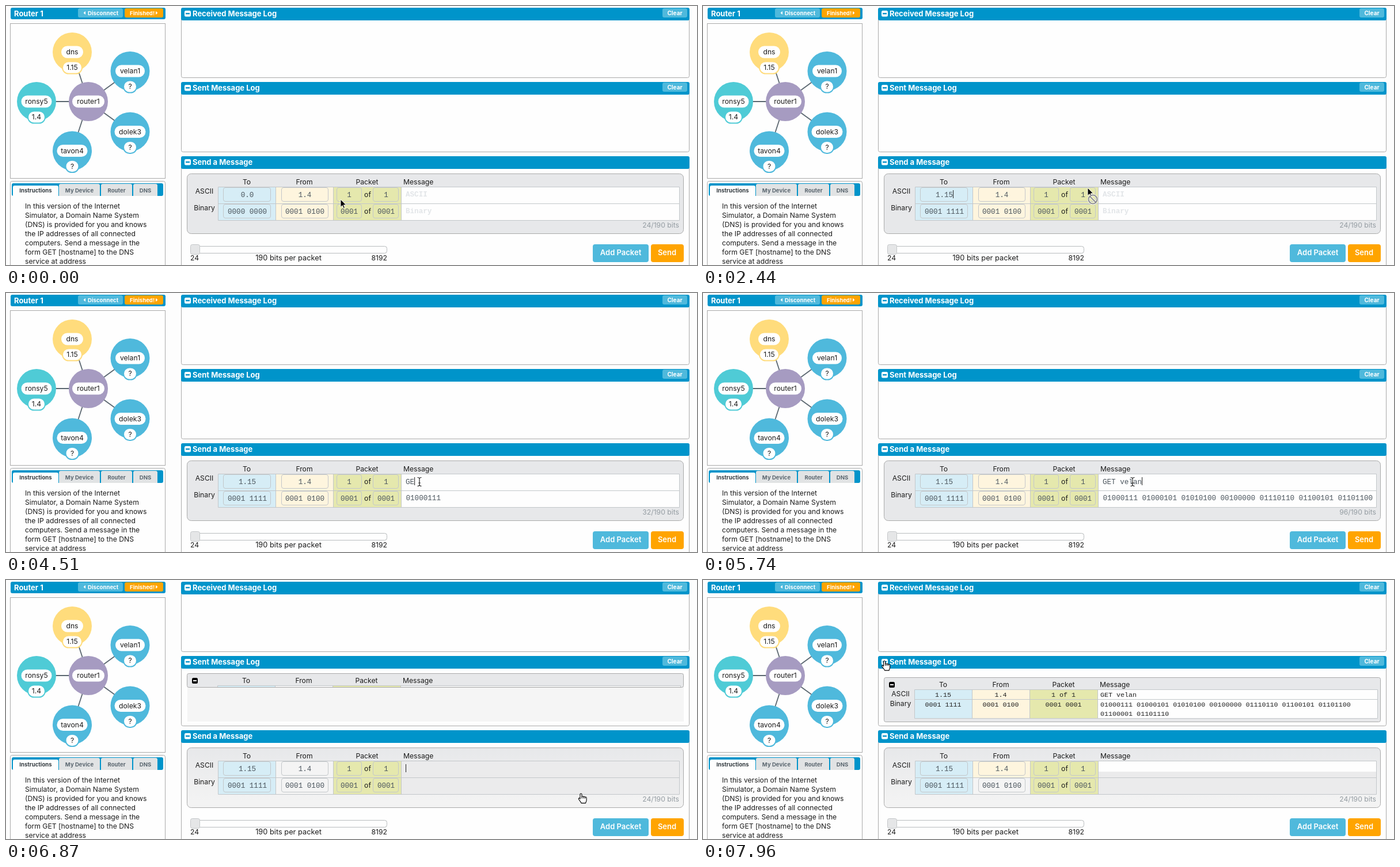
These frames come from a looping animation (1200x450 px, 8000 ms). An HTML page:

```html
<!DOCTYPE html>
<html lang="en">
<head>
<meta charset="utf-8">
<title>Internet Simulator</title>
<style>
html, body { margin: 0; width: 100%; height: 100%; overflow: hidden; background: #fdfdfd; }
svg { display: block; width: 100vw; height: 100vh; }
text { font: 12.2px Inter, "Open Sans", sans-serif; fill: #1c1c1c; }
.mid { text-anchor: middle; }
.end { text-anchor: end; }
.head { font-size: 13px; font-weight: 700; fill: #fff; }
.small { font-size: 9.6px; font-weight: 700; fill: #fff; }
.tab { font-size: 9.6px; font-weight: 700; fill: #5b6770; }
.btn { font-size: 13px; font-weight: 600; fill: #fff; }
.mono { font: 12.6px "Liberation Mono", "Courier New", monospace; fill: #4d575f; }
.log { font: 11.7px "Liberation Mono", "Courier New", monospace; fill: #222; }
.hint { font-weight: 700; fill: #e2e5e8; }
.dim { fill: #949ca2; }
</style>
</head>
<body>
<svg id="stage" viewBox="0 0 1200 450" preserveAspectRatio="none"></svg>
<script>
const LOOP = 8000, CHAR = 7.56;
const BLUE = '#0094ca', SKY = '#4fb9dc', ORANGE = '#ffa400', PANEL = '#e7e8ea';
const TO = '#d6edf6', FROM = '#fef5de', PACKET = '#e5e8ad', WHITE = '#fefefe';
const EDGE = '#aaaaaa', RULE = '#c3c7ca';
const HOST = 'velan', MESSAGE = 'GET ' + HOST;

const rect = (x, y, w, h, fill, more = '') =>
  `<rect x="${x}" y="${y}" width="${w}" height="${h}" fill="${fill}" ${more}/>`;
const text = (x, y, s, cls = '', more = '') =>
  `<text x="${x}" y="${y}" class="${cls}" ${more}>${s}</text>`;
const path = (d, more) => `<path d="${d}" ${more}/>`;
const group = (id, body, more = '') => `<g id="${id}" ${more}>${body}</g>`;
const line = (d, color = RULE) => path(d, `fill="none" stroke="${color}"`);
const stroke = c => `stroke="${c}"`;

function nodes() {
  const list = [
    [115, 80, '#ffdc7c', 'dns', 38, '1.15', 36],
    [215.5, 113, SKY, HOST + '1', 51, '?', 25],
    [215.5, 218.5, SKY, 'dolek3', 54, '?', 25],
    [115, 251.5, SKY, 'tavon4', 53, '?', 25],
    [53, 166, '#4fcbd6', 'ronsy5', 53, '1.4', 32],
    [143, 166, '#a69bc1', 'router1', 56]
  ];
  const spokes = list.slice(0, 5).map(([x, y]) =>
    path(`M143 166L${x} ${y}`, 'stroke="#5b6770" stroke-width="1.8"')).join('');
  return spokes + list.map(([x, y, color, name, w, addr, aw]) =>
    `<circle cx="${x}" cy="${y}" r="34" fill="${color}"/>` +
    rect(x - w / 2, y - 10.5, w, 21, '#fff', 'rx="10.5"') +
    text(x, y + 4, name, 'mid') +
    (addr ? rect(x - aw / 2 + 1, y + 16.5, aw - 2, 21, '#fff', `rx="10.5" stroke-width="2" ${stroke(color)}`) +
      text(x, y + 31, addr, 'mid') : '')).join('');
}

function sidebar() {
  const tabs = [[12, 79, 'Instructions'], [92, 71, 'My Device'], [165, 54, 'Router'], [221, 42, 'DNS']];
  const lines = ['In this version of the Internet', 'Simulator, a Domain Name System',
    '(DNS) is provided for you and knows', 'the IP addresses of all connected',
    'computers. Send a message in the', 'form GET [hostname] to the DNS', 'service at address'];
  return rect(8, 3, 269, 20, BLUE, 'rx="3"') + text(14, 18, 'Router 1', 'head') +
    rect(125, 4, 78, 16, SKY, 'rx="3"') + path('M138 9v6l-3.5-3z', 'fill="#fff"') +
    text(142, 15.5, 'Disconnect', 'small') +
    rect(206, 4, 67, 16, ORANGE, 'rx="3"') + path('M260 9v6l3.5-3z', 'fill="#fff"') +
    text(215, 15.5, 'Finished!', 'small') +
    rect(7.5, 30.5, 269, 269, WHITE, stroke(EDGE)) + nodes() +
    rect(7.5, 304.5, 269, 160, WHITE, stroke(EDGE) + ' rx="3"') +
    rect(10, 308, 263, 22, BLUE, 'rx="3"') +
    tabs.map(([x, w, s], i) =>
      path(`M${x} ${i ? 330 : 332}v-18q0-3 3-3h${w - 6}q3 0 3 3v18z`, `fill="${i ? '#e1e3e4' : WHITE}" transform="translate(0 ${i ? 0 : 1})"`) +
      text(x + w / 2, 324, s, 'tab mid', i ? '' : 'style="fill:#333b40"')).join('') +
    lines.map((s, i) => text(33, 352 + 16 * i, s)).join('');
}

function section(y, title, bottom, clear) {
  return rect(304.5, y + 10.5, 882, bottom - y - 10.5, WHITE, stroke(EDGE) + ' rx="3"') +
    rect(304, y, 883, 22, BLUE, 'rx="3"') +
    rect(310, y + 5, 11, 10.5, '#fff', 'rx="2.5"') + rect(312, y + 9, 7, 2.4, BLUE) +
    text(324, y + 14.5, title, 'head') +
    (clear ? rect(1140, y + 1, 43, 16, SKY, 'rx="3"') +
      text(1161.5, y + 12.8, 'Clear', 'small mid', 'style="font-size:10px"') : '');
}

function entry() {
  const heads = text(417, 17, 'To', 'mid') + text(517, 17, 'From', 'mid') +
    text(626, 17, 'Packet', 'mid') + text(689, 17, 'Message') +
    text(343, 33, 'ASCII', 'mid') + text(343, 50, 'Binary', 'mid');
  const cells = [[417, '1.15', '0001 1111'], [517, '1.4', '0001 0100'], [626, '1 of 1', '0001 0001']];
  const bytes = toBytes(MESSAGE);
  return group('slideBack', rect(315, 0, 862, 84, '#f5f5f5')) +
    `<clipPath id="clip"><rect id="clipBox" x="314" y="0" width="864" height="78"/></clipPath>` +
    rect(314.5, .5, 862, 77, PANEL, `id="entryBox" rx="3" ${stroke(EDGE)}`) +
    group('entryBody', rect(323, 8, 10, 10, '#000', 'rx="2.5"') + rect(325, 12, 6, 2, '#fff') + heads +
      rect(367, 21, 100, 51, TO) + rect(467, 21, 100, 51, FROM, 'id="entryFrom"') +
      rect(567, 21, 118, 51, PACKET) + rect(685, 21, 486, 51, WHITE, 'id="entryMsg"') +
      line('M367.5 21.5H1171.5V71.5H367.5zM367 38.5H1171M467.5 21V71M567.5 21V71M685.5 21V71') +
      cells.map(([x, a, b]) => text(x, 34, a, 'log mid') + text(x, 51, b, 'log mid')).join('') +
      text(690, 34, MESSAGE, 'log') + text(690, 51, bytes.slice(0, 7).join(' '), 'log') +
      text(690, 67, bytes.slice(7).join(' '), 'log'), 'clip-path="url(#clip)"');
}

function form() {
  const field = (x, w) => [315.5, 344.5].map(y =>
    rect(x + .5, y, w, 24, 'none', `rx="3.5" ${stroke(RULE)}`)).join('');
  const value = (x, a, b) => text(x, 332, a, 'mono mid') + text(x, 361, b, 'mono mid');
  return rect(314.5, 291.5, 862, 104, PANEL, `id="formBox" rx="7" ${stroke(EDGE)}`) +
    text(418, 310, 'To', 'mid') + text(518, 310, 'From', 'mid') + text(627, 310, 'Packet', 'mid') +
    text(690, 310, 'Message') + text(344.5, 326, 'ASCII', 'mid') + text(344.5, 355, 'Binary', 'mid') +
    rect(369, 315, 100, 57, TO) + rect(469, 315, 100, 57, FROM) + rect(569, 315, 118, 57, PACKET) +
    rect(687, 315, 482, 57, WHITE) +
    group('faded', rect(469, 315, 100, 57, '#f4f4f4') + rect(687, 315, 482, 57, '#ebebec')) +
    rect(687, 315, 482, 18, WHITE, 'id="msgBack"') + rect(469, 315, 100, 28, FROM, 'id="fromBack"') +
    line('M368.5 314.5H1169.5V372.5H368.5zM369 343.5H1169M468.5 315V372M568.5 315V372M686.5 315V372') +
    field(377, 82) + field(478, 81) + field(574, 43) + field(637, 44) +
    text(628, 332, 'of', 'mid') + text(628, 361, 'of', 'mid') +
    rect(408, 321, 22, 14, '#b5d5fd', 'id="pick"') +
    group('values', text(419, 332, '', 'mono mid', 'id="to"') + text(419, 361, '', 'mono mid', 'id="toBin"') +
      value(519, '1.4', '0001 0100') + value(596, '1', '0001') + value(660, '1', '0001')) +
    group('hints', text(694, 331, 'ASCII', 'mono hint') + text(694, 360, 'Binary', 'mono hint')) +
    text(694, 331.5, '', 'mono', 'id="msg"') + text(694.5, 360, '', 'mono', 'id="msgBin"') +
    rect(0, 320, 1, 14, '#222', 'id="caret"') +
    text(1169, 385, '', 'end dim', 'id="count"');
}

function controls() {
  return line('M337 417.5H658q3.500 0 3.500 3.500V426q0 3.500-3.500 3.500H337', '#e6e8e9') +
    group('slider', rect(320.5, 417.5, 341, 12, WHITE, `rx="4" ${stroke('#b9bcbe')}`) +
      rect(320.5, 414.5, 16, 17, '#e5e6e7', `rx="3" ${stroke('#c4c7c9')}`)) +
    text(320, 442, '24') + text(490.5, 442, '190 bits per packet', 'mid', 'style="font-size:12.8px"') +
    text(662, 442, '8192', 'end') +
    rect(1019, 414, 97, 31, SKY, 'id="add" rx="4"') + text(1067.5, 433, 'Add Packet', 'btn mid') +
    rect(1120, 414, 57, 31, ORANGE, 'id="send" rx="4"') + text(1148, 433, 'Send', 'btn mid');
}

function pointers() {
  const arrow = path('M0 0V13.500L3.200 10.600 5.300 15.500 7.400 14.600 5.300 9.800H9.700z', 'fill="#000" stroke="#fff" stroke-width=".9"');
  const beam = path('M-3.500-7.500Q0-7.500 0-5V5Q0 7.500-3.500 7.500M3.500-7.500Q0-7.500 0-5V5Q0 7.500 3.500 7.500M-1.800 2H1.800', 'fill="none" stroke="#222" stroke-width="1.2"');
  const sign = w => `<circle cx="9" cy="20" r="7.500" fill="none" ${w}/>` + path('M4 15L14 25', w);
  const hand = path('M-4.500-7c0-2 3-2 3 0v4c0-1 2.600-1.200 2.800.3.4-1 2.600-.8 2.700.6.6-.8 2.600-.4 2.600 1.200v4c0 2-1.200 3-1.600 5h-7.400c-.5-2-3.400-4.500-4.600-6.800-.8-1.600 1-2.800 2.500-.8zM-1.500-3v3M1.300-2.700v2.700M4-2.100v2.300',
    'fill="#fff" stroke="#000" stroke-width="1.1"');
  return group('pointer', group('arrow', arrow) + group('beam', beam) +
    group('sign', sign('stroke="#fff" stroke-width="3.4"') + sign('stroke="#8d8d8d" stroke-width="2"')) +
    group('hand', hand));
}

function toBytes(s) {
  return [...s].map(c => c.charCodeAt(0).toString(2).padStart(8, '0'));
}

document.getElementById('stage').innerHTML =
  `<defs><linearGradient id="wash" x2="0" y2="1"><stop stop-color="${PANEL}"/><stop offset=".9" stop-color="#f3f3f3"/></linearGradient></defs>` +
  rect(0, 0, 1200, 450, '#fdfdfd') + sidebar() +
  section(3, 'Received Message Log', 124.5, true) + section(132, 'Sent Message Log', 253.5, true) +
  group('entry', entry()) + section(261, 'Send a Message', 470) +
  form() + controls() + pointers();

const ui = {};
document.querySelectorAll('[id]').forEach(e => ui[e.id] = e);
const show = (id, on) => ui[id].style.display = on ? '' : 'none';
const set = (id, name, v) => ui[id].setAttribute(name, v);
const write = (id, s) => { if (ui[id].textContent !== s) ui[id].textContent = s; };
const within = (t, a, b) => t >= a && t < b;

// Step tracks: the value holds until the next time
const at = (track, t) => track.reduce((v, [when, next]) => t >= when ? next : v, track[0][1]);
const toTrack = [[0, '0.0'], [1340, '1'], [1690, '1.'], [1800, '1.1'], [2040, '1.15']];
const binTrack = [[0, '0000 0000'], [1450, '0001 0000'], [1980, '0001 0001'], [2100, '0001 1111']];
const msgTrack = [[0, ''], [3210, 'G'], [3410, 'Ge'], [3560, 'Get'], [4330, 'Ge'], [4400, 'G'], [4510, 'GE'], [4680, 'GET']];
for (let n = 4; n <= MESSAGE.length; n++) msgTrack.push([5040 + 68 * (n - 4), MESSAGE.slice(0, n)]);
const kindTrack = [[0, 'arrow'], [340, 'beam'], [2200, 'arrow'], [2380, 'sign'], [2500, 'beam'], [5920, 'arrow'], [6220, 'hand']];

const route = [[40, 581, 336], [160, 545, 342], [280, 440, 343], [340, 416, 346], [460, 416, 346], [520, 419, 328],
  [2140, 419, 328], [2200, 450, 322], [2320, 580, 303], [2440, 668, 316], [2560, 722, 326], [2680, 718, 328],
  [5680, 718, 328], [5740, 746, 328], [5920, 900, 350], [6160, 1090, 420], [6340, 1147, 440], [6460, 1148, 436],
  [6700, 1148, 436], [6940, 855, 323], [7120, 600, 220], [7300, 600, 220], [7600, 400, 135], [7780, 330, 128], [7960, 318, 149]];

function place(t) {
  const i = route.findIndex(p => p[0] > t);
  if (i === 0) return route[0].slice(1);
  if (i < 0) return route[route.length - 1].slice(1);
  const [a, b] = [route[i - 1], route[i]], k = (t - a[0]) / (b[0] - a[0]);
  return [1, 2].map(n => a[n] + (b[n] - a[n]) * k);
}

function drawPointer(t) {
  const [x, y] = place(t - (t + 20) % 60);
  const kind = at(kindTrack, t);
  set('pointer', 'transform', `translate(${x} ${y})`);
  show('pointer', !within(t, 1340, 2140));
  show('arrow', kind === 'arrow' || kind === 'sign');
  for (const k of ['beam', 'sign', 'hand']) show(k, kind === k);
}

function drawForm(t) {
  const busy = within(t, 6600, 6720), sent = t >= 6720;
  const to = at(toTrack, t);
  const msg = t < 6600 ? at(msgTrack, t) : '';
  const late = t < 6600 ? at(msgTrack, Math.max(0, t - 60)) : '';
  write('to', to);
  write('toBin', at(binTrack, t));
  write('msg', msg);
  write('msgBin', toBytes(late).slice(0, 7).join(' '));
  const size = busy ? MESSAGE.length : late.length;
  write('count', `${24 + 8 * size}/190 bits`);
  show('values', !busy);
  show('hints', !msg && !sent);
  show('pick', within(t, 560, 1340));

  const inTo = within(t, 1340, 2730);
  set('caret', 'x', inTo ? 419 + CHAR / 2 * to.length : 694 + CHAR * msg.length);
  show('caret', inTo || within(t, 2730, 4090) || within(t, 4330, 6600) || within(t, 6720, 7330));

  show('slider', !busy);
  set('add', 'fill', busy ? '#c5c8ca' : SKY);
  set('send', 'fill', busy ? '#c5c8ca' : ORANGE);
  set('formBox', 'fill', sent ? 'url(#wash)' : PANEL);
  show('faded', sent);
  show('msgBack', t >= 7070);
  show('fromBack', t >= 7330);
}

function drawEntry(t) {
  const k = Math.min(1, Math.max(0, (t - 6720) / 400));
  const p = .5 - Math.cos(Math.PI * k) / 2;
  show('entry', p > 0);
  set('entry', 'transform', `translate(0 ${Math.round(159.5 + 9.5 * p)})`);
  set('entryBox', 'height', 77 * p);
  set('clipBox', 'height', 77 * p);
  show('slideBack', k < 1);
  set('entryFrom', 'fill', k < 1 ? '#f6f6f6' : FROM);
  set('entryMsg', 'fill', k < 1 ? '#f2f2f2' : WHITE);
}

function frame(now) {
  const t = now % LOOP;
  drawForm(t);
  drawEntry(t);
  drawPointer(t);
  requestAnimationFrame(frame);
}
const start = performance.now();
const tick = frame;
requestAnimationFrame(function run() {
  tick(Math.max(0, performance.now() - start));
});
</script>
</body>
</html>
```
